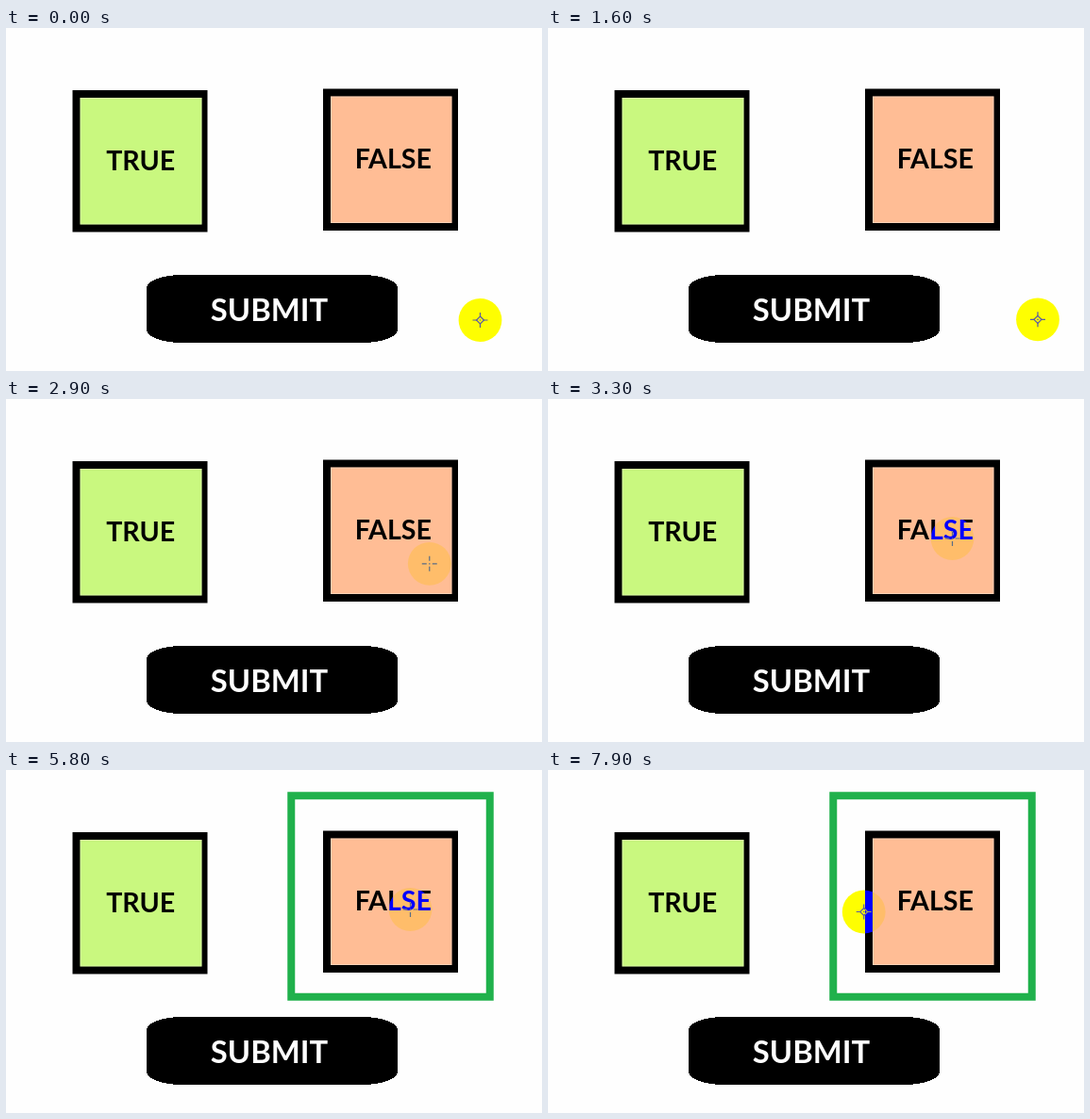
Write an HTML page that moves like this. It is 568x364 px and loops after 8 s.

```html
<!DOCTYPE html>
<html lang="en">
<head>
<meta charset="utf-8">
<title>True or false</title>
<style>
  html, body { margin: 0; width: 100%; height: 100%; overflow: hidden; background: #fefefe; }
  svg { display: block; width: 100%; height: 100%; isolation: isolate; }
  text { font: 700 28.6px Lato, "Open Sans", sans-serif; text-anchor: middle; }
  .submit { font-size: 32.8px; fill: #fff; }
  .edge { fill: none; stroke: #fff; stroke-opacity: .3; }
  .spot, .cross { mix-blend-mode: difference; }
  .cross { fill: none; stroke: #fff; stroke-width: 1.2; opacity: .65; }
</style>
</head>
<body>
<svg viewBox="0 0 568 364">
  <rect width="568" height="364" fill="#fefefe"/>

  <rect x="70.5" y="66" width="143" height="150.5"/>
  <rect x="78.5" y="74" width="129" height="134.5" fill="#c9f87f"/>
  <rect class="edge" x="79" y="74.5" width="128" height="133.5"/>
  <text x="142.7" y="150.5">TRUE</text>

  <rect x="336" y="64.5" width="143" height="150.5"/>
  <rect x="344" y="72.5" width="128.5" height="134.5" fill="#ffbd95"/>
  <rect class="edge" x="344.5" y="73" width="127.5" height="133.5"/>
  <text x="410.3" y="149">FALSE</text>

  <rect x="149" y="262" width="266" height="72" rx="37" ry="14" shape-rendering="crispEdges"/>
  <text class="submit" x="279" y="310.5">SUBMIT</text>

  <rect id="frame" x="302.25" y="27.25" width="210.5" height="213.5" fill="none" stroke="#20b14c" stroke-width="8"/>

  <!-- The spot inverts only the blue channel beneath it. -->
  <circle id="spot" class="spot" r="22.9" fill="#00f"/>
  <g id="cross" class="cross">
    <path d="M-8 0H-3M3 0H8M0-8V-3M0 3V8M-.7 0H.7"/>
    <path id="ring" d="M0-4L4 0L0 4L-4 0Z"/>
  </g>
</svg>
<script>
  const LOOP = 8000, STEP = 100, ANSWERED = 5700;
  const $ = id => document.getElementById(id);
  const frame = $('frame'), spot = $('spot'), cross = $('cross'), ring = $('ring');

  // Pointer moves, in order; it rests between them.
  const moves = [
    { from: 0, to: 300, start: [502.5, 310], end: [519, 309.3] },
    { from: 2100, to: 3000, start: [519, 309.3], end: [440, 158] },
    { from: 3000, to: 3300, start: [440, 158], end: [428.5, 148] },
    { from: 7300, to: 7500, start: [428.5, 148], end: [409, 149] },
    { from: 7600, to: 7900, start: [409, 149], end: [334.7, 150.5] }
  ];
  const clicks = [0, 1600, 5400, 7900];

  function pointerAt(t) {
    const { from, to, start, end } = moves.findLast(move => move.from <= t);
    const k = Math.min(1, (t - from) / (to - from));
    return start.map((value, i) => value + (end[i] - value) * k);
  }

  const show = (part, on) => part.setAttribute('visibility', on ? 'visible' : 'hidden');

  function draw(time) {
    const t = Math.floor(time % LOOP / STEP) * STEP;
    const place = `translate(${pointerAt(t).join(' ')})`;
    spot.setAttribute('transform', place);
    cross.setAttribute('transform', place);
    show(ring, clicks.includes(t));
    show(frame, t >= ANSWERED);
  }

  const began = performance.now();
  function tick() {
    draw(performance.now() - began);
    requestAnimationFrame(tick);
  }
  tick();
</script>
</body>
</html>
```
